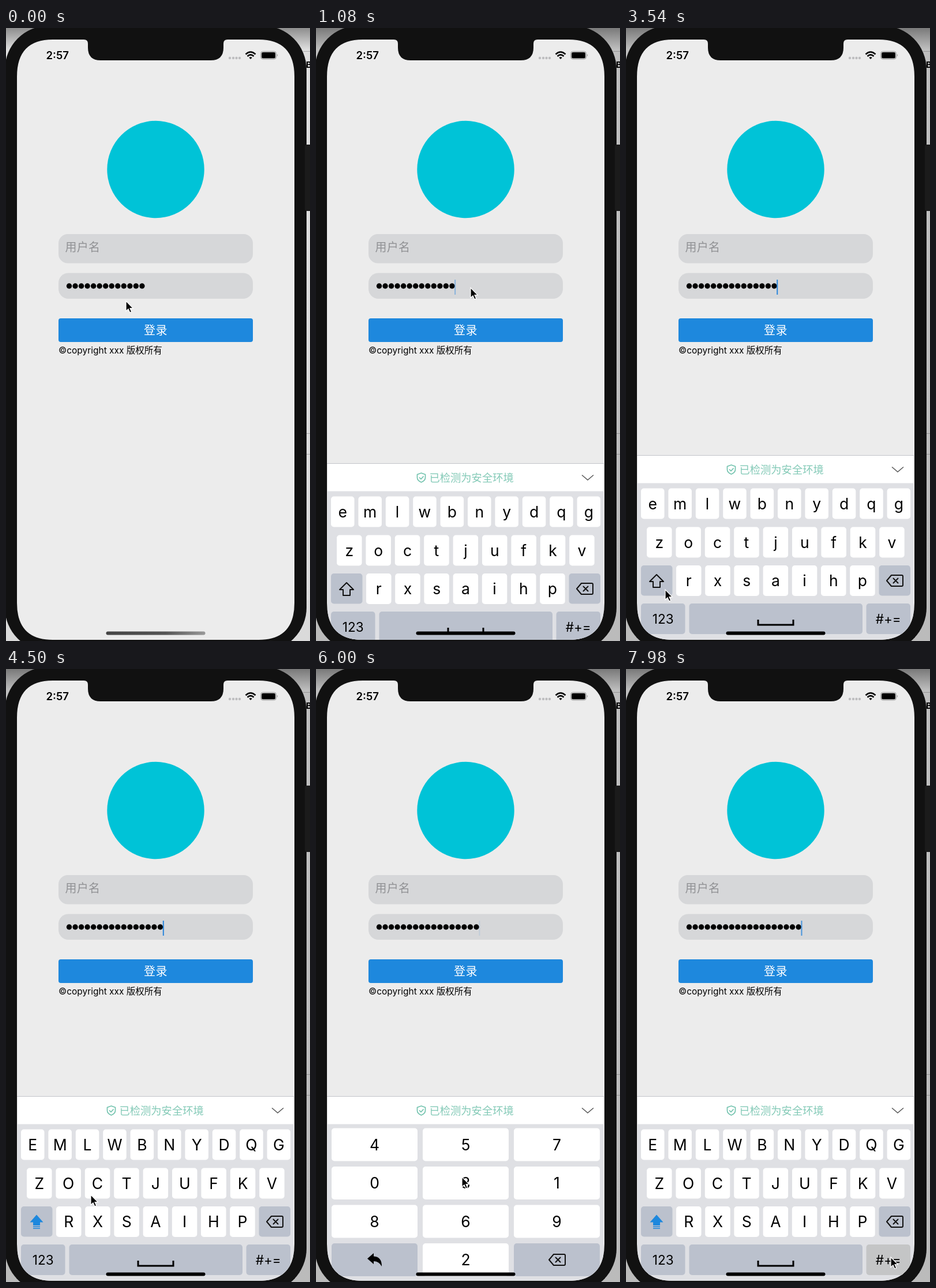
These frames come from a looping animation (527 by 1062 pixels, 8 s). An HTML page:

```html
<!DOCTYPE html>
<html lang="zh-CN">
<head>
<meta charset="utf-8">
<title>Secure keyboard</title>
<style>
html, body { margin: 0; width: 100%; height: 100%; overflow: hidden; background: #111; }
svg { display: block; width: 527px; height: 1062px; }
text { font-family: Inter, "Noto Sans CJK SC", "Noto Sans CJK", sans-serif; white-space: pre; }
.cjk { font-family: "Noto Sans CJK SC", "Noto Sans CJK", sans-serif; }
.line { fill: none; stroke: #111; stroke-width: 2; stroke-linejoin: round; stroke-linecap: round; }
</style>
</head>
<body>
<svg id="stage" viewBox="0 0 527 1062" xmlns="http://www.w3.org/2000/svg">
  <defs>
    <linearGradient id="desk" x2="0" y2="1">
      <stop offset="0" stop-color="#8d8d8d"/>
      <stop offset=".035" stop-color="#dedede"/>
      <stop offset="1" stop-color="#dadada"/>
    </linearGradient>
    <linearGradient id="bar">
      <stop offset="0" stop-color="#444"/>
      <stop offset=".6" stop-color="#555"/>
      <stop offset="1" stop-color="#999"/>
    </linearGradient>
    <clipPath id="screen">
      <path id="glass" d="M81 20H135Q142 20 142 27V34Q142 56 164 56H355Q377 56 377 34V27Q377 20 384 20H438Q500 20 500 84V996Q500 1060 438 1060H81Q19 1060 19 996V84Q19 20 81 20Z"/>
    </clipPath>
  </defs>

  <rect width="527" height="1062" fill="url(#desk)"/>
  <path d="M515 40.500h12M515 702.500h12M515 738.500h12" stroke="#aaa"/>
  <text x="520" y="69" font-size="15" font-weight="700">B</text>
  <rect id="shade" width="527" height="1062" opacity=".14"/>
  <rect x="-2" y="-4" width="523" height="1084" rx="76" fill="#111"/>
  <rect x="518" y="202" width="14" height="115" rx="4" fill="#1b1b1b"/>
  <use href="#glass" fill="#ececec"/>

  <text x="69.500" y="54" font-size="18.500" font-weight="600">2:57</text>
  <g fill="#bdbdbf">
    <circle cx="388" cy="52" r="2.200"/><circle cx="394" cy="52" r="2.200"/>
    <circle cx="399.500" cy="52" r="2.200"/><circle cx="405" cy="52" r="2.200"/>
  </g>
  <g fill="none" stroke="#000" stroke-width="2.600">
    <path d="M415.500 45.500Q424 37.500 432.500 45.500M418.500 49Q424 43.800 429.500 49"/>
    <path d="M421.300 51.300Q424 49 426.700 51.300L424 54Z" fill="#000" stroke="none"/>
  </g>
  <rect x="441.500" y="40.500" width="27" height="13.500" rx="4" fill="none" stroke="#8f8f8f"/>
  <rect x="443" y="42" width="24" height="10.500" rx="2.500"/>
  <path d="M470 45q2 2 0 4.500z" fill="#8f8f8f"/>

  <circle cx="259.500" cy="245" r="84.200" fill="#00c3d7"/>
  <rect x="91" y="357" width="337" height="50.500" rx="16" fill="#d6d7d9"/>
  <text class="cjk" x="102.500" y="387" font-size="20" letter-spacing=".3" fill="#909194">用户名</text>
  <rect x="91" y="424.500" width="337" height="44.500" rx="17" fill="#d6d7d9"/>
  <g id="dots"></g>
  <rect id="caret" y="436" width="2" height="26" fill="#2a86dd"/>
  <rect x="91" y="503" width="337" height="41" rx="4" fill="#1e88dd"/>
  <text class="cjk" x="259.500" y="531" font-size="20" letter-spacing=".5" text-anchor="middle" fill="#fff">登录</text>
  <text x="91" y="564" font-size="15.500">©copyright xxx 版权所有</text>

  <g clip-path="url(#screen)">
    <g id="board">
      <rect x="20" y="740" width="478.500" height="330" fill="#dfe0e4"/>
      <rect x="20" y="741" width="478.500" height="47.500" fill="#fff"/>
      <path d="M19 740.500H499" stroke="#c3c5ca"/>
      <g fill="none" stroke="#73c3ae" stroke-width="1.700" stroke-linejoin="round">
        <path d="M182.500 757L189.500 759.500V765Q189.500 770 182.500 773Q175.500 770 175.500 765V759.500Z"/>
        <path d="M179 764.500L182 767.500L186.500 762.500"/>
      </g>
      <text class="cjk" x="196.500" y="772" font-size="18.300" font-weight="500" fill="#82c9b6">已检测为安全环境</text>
      <path d="M461 760.500L471 769L481 760.500" fill="none" stroke="#555" stroke-width="1.400"/>
      <g id="letters"></g>
      <g id="digits"></g>
    </g>
  </g>
  <rect id="home" x="173.500" y="1045.500" width="172" height="6" rx="3"/>
  <path id="mouse" d="M0 0V17.500L4 13.700L6.800 20L9.700 18.700L7 12.600H12.300Z" stroke="#fff" stroke-width="1.200"/>
</svg>
<script>
const LOOP = 8000, TICK = 60;
const $ = id => document.getElementById(id);
const GREY = '#bbc1cd', HELD = '#c4c5c6';

function add(parent, tag, attrs, text) {
  const el = document.createElementNS('http://www.w3.org/2000/svg', tag);
  for (const k in attrs) el.setAttribute(k, attrs[k]);
  if (text) el.textContent = text;
  parent.append(el);
  return el;
}

function key(parent, x, y, width, height, fill, label, size = 26.5) {
  const box = add(parent, 'rect', { x, y, width, height, rx: 5, fill });
  const cap = label && add(parent, 'text', {
    x: x + width / 2, y: y + height / 2 + size * .363, 'font-size': size, 'text-anchor': 'middle'
  }, label);
  return { box, cap };
}

function eraser(parent, x, y) {
  add(parent, 'path', {
    class: 'line', transform: `translate(${x} ${y})`,
    d: 'M-14 0L-6 -9.500H12Q14 -9.500 14 -7.500V7.500Q14 9.500 12 9.500H-6ZM-2.500 -4L5.500 4M5.500 -4L-2.500 4'
  });
}

// Letter layout
const L = $('letters'), caps = [];
const rows = [
  ['emlwbnydqg', 26, 47.4, 40.5, 797.5],
  ['zoctjufkv', 36, 50.4, 43.5, 864.5],
  ['rxsaihp', 87, 50.2, 43.5, 931]
];
for (const [chars, x, step, w, y] of rows)
  [...chars].forEach((c, i) => caps.push(key(L, x + i * step, y, w, 53, '#fff', c).cap));
const shift = key(L, 26, 931, 54.5, 52.5, GREY).box;
key(L, 438.500, 931, 54.5, 52.5, GREY);
const num = key(L, 26, 997, 76.5, 53, GREY, '123', 22.5).box;
key(L, 109.500, 997, 300.5, 53, GREY);
const sym = key(L, 416.500, 997, 76.5, 53, GREY, '#+=', 22.5).box;
const arrow = add(L, 'path', { class: 'line', 'stroke-width': 1.6, d: 'M53 947L65 959H59V969H47V959H41Z' });
const arrowOn = add(L, 'path', { fill: '#1e88dd', d: 'M53 945.500L64.500 958.500H59V964H47V958.500H41.500ZM47 965.500H59V967H47ZM47 968.500H59V970H47Z' });
eraser(L, 466, 957.500);
add(L, 'path', { d: 'M229 1025V1034H290V1025', fill: 'none', stroke: '#000', 'stroke-width': 3 });

// Number layout
const D = $('digits');
let back;
[...'457031869<2-'].forEach((c, i) => {
  const edge = i === 9 || i === 11;
  const k = key(D, 27 + i % 3 * 158, 795.5 + Math.floor(i / 3) * 66.5, 149, 57, edge ? GREY : '#fff', edge ? '' : c);
  if (i === 9) back = k.box;
});
add(D, 'path', { d: 'M89 1021.500L100 1012V1017.500Q114 1018 114 1035Q109 1026 100 1026V1031Z' });
eraser(D, 418, 1023.500);

const dots = Array.from({ length: 19 }, (_, i) =>
  add($('dots'), 'circle', { cx: 109.5 + i * 10.53, cy: 447, r: 4.7 }));

// Times at which a character is entered, after the first 13
const typed = [1860, 2820, 4380, 5880, 6420, 6900];
// Pointer stops: time, x, y
const stops = [
  [0, 208, 473], [240, 268, 450], [1320, 268, 450], [1800, 213, 816], [2160, 213, 816],
  [2700, 205, 965], [3000, 205, 965], [3480, 68, 973], [3720, 68, 973], [4260, 147, 911],
  [4800, 147, 911], [5100, 62, 1020], [5340, 62, 1020], [5760, 253, 880], [6060, 253, 880],
  [6360, 252, 1015], [6540, 252, 1015], [6840, 96, 950], [7020, 96, 950], [7200, 101, 1018],
  [7440, 101, 1018], [7860, 459, 1019], [8000, 459, 1019]
];

function pointer(t) {
  const i = stops.findIndex(s => s[0] > t);
  const [t0, x0, y0] = stops[i - 1], [t1, x1, y1] = stops[i];
  const p = (t - t0) / (t1 - t0), e = p * p * (3 - 2 * p);
  return [x0 + (x1 - x0) * e, y0 + (y1 - y0) * e];
}

function caretAlpha(t) {
  if (t < 780) return 0;
  const p = (t + (t < 6900 ? 0 : 140)) % 1000 / 1000;
  if (p < .14) return Math.max(.12, (p - .03) / .11);
  return Math.min(1, Math.max(.08, (.8 - p) / .1));
}

// Critically damped slide of the keyboard
function sink(t) {
  const s = Math.max(0, t - 810) / 1000 * 18.2;
  return t >= 1440 ? 0 : 322 * (1 + s) * Math.exp(-s);
}

const show = (el, on) => el.setAttribute('visibility', on ? 'inherit' : 'hidden');
const hold = (el, on) => el.setAttribute('fill', on ? HELD : GREY);

function draw(now) {
  const t = Math.floor(now % LOOP / TICK) * TICK;
  const count = 13 + typed.filter(x => t >= x).length;
  const upper = t >= 3660, pad = t >= 5280 && t < 7440;

  dots.forEach((d, i) => show(d, i < count));
  $('caret').setAttribute('x', 103 + count * 10.55);
  $('caret').setAttribute('opacity', caretAlpha(t));
  $('board').setAttribute('transform', `translate(0 ${sink(t)})`);
  $('mouse').setAttribute('transform', `translate(${pointer(t)})`);
  $('home').setAttribute('fill', t < 900 ? 'url(#bar)' : '#000');
  show($('shade'), t >= 720);
  show(L, !pad);
  show(D, pad);
  show(arrow, !upper);
  show(arrowOn, upper);
  for (const c of caps)
    c.textContent = upper ? c.textContent.toUpperCase() : c.textContent.toLowerCase();
  hold(shift, t >= 3600 && t < 3720);
  hold(num, t >= 5160 && t < 5280);
  hold(back, t >= 7260 && t < 7440);
  hold(sym, t >= 7920);
}

const start = performance.now();
function frame() {
  draw(performance.now() - start);
  requestAnimationFrame(frame);
}
frame();
</script>
</body>
</html>
```
